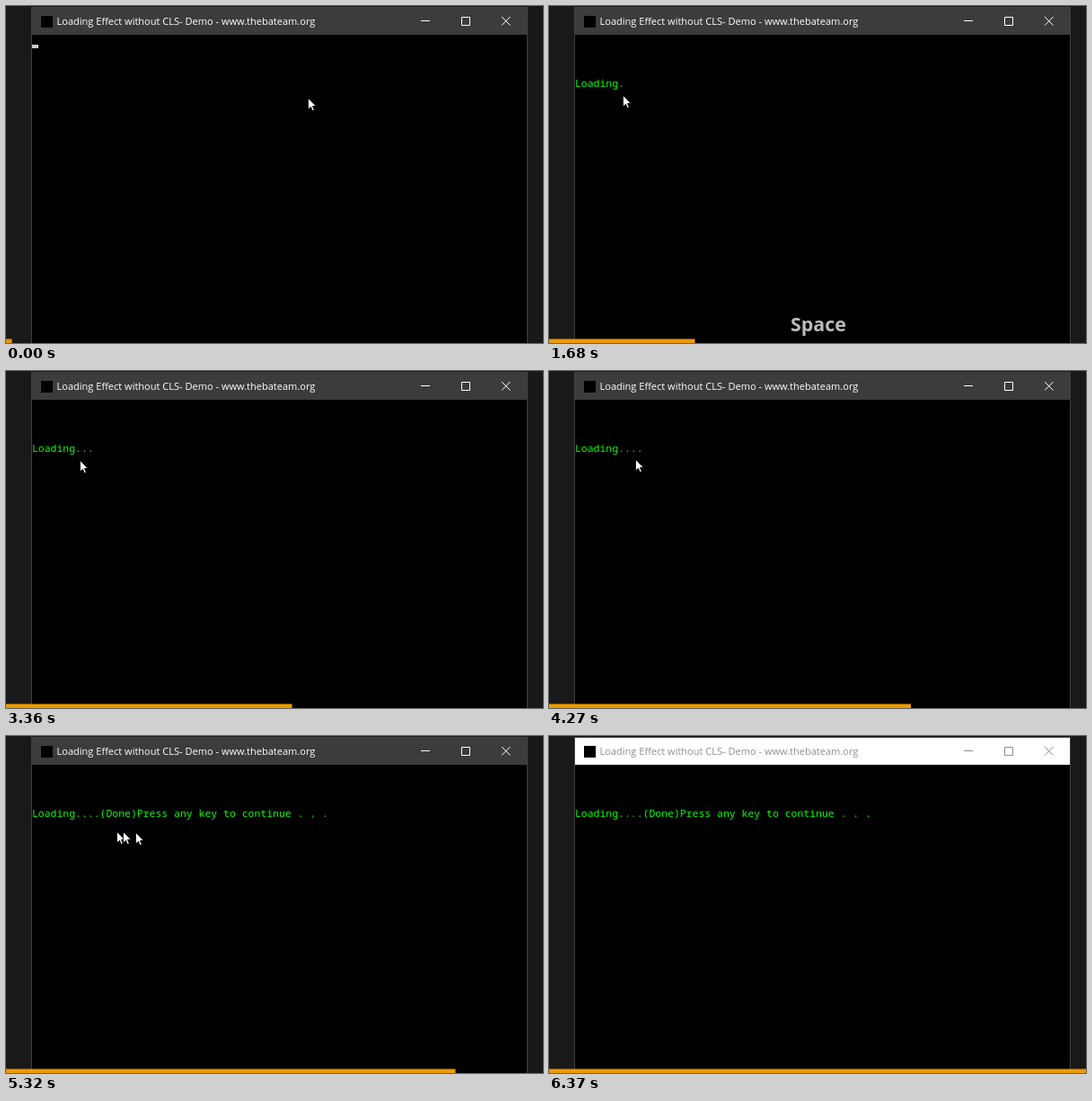
An HTML page with a canvas that plays this animation: 598 by 375 pixels, repeating every 6440 ms.

```html
<!DOCTYPE html>
<html lang="en">
<head>
<meta charset="utf-8">
<title>Loading effect</title>
<style>
  html, body { margin: 0; width: 100%; height: 100%; overflow: hidden; background: #191919; }
  canvas { display: block; }
</style>
</head>
<body>
<canvas id="stage" width="598" height="375"></canvas>
<script>
const ctx = document.getElementById('stage').getContext('2d');
const WIDTH = 598, HEIGHT = 375;
const STEP = 70, STEPS = 92;
const TRAIL_LENGTH = 7, TRAIL_GAP = 35;

const TITLE = 'Loading Effect without CLS- Demo - www.thebateam.org';
const LOADING_AT = 350, FIRST_DOT_AT = 1377, DOT_GAP = 863, DOTS = 4;
const DONE_AT = FIRST_DOT_AT + DOTS * DOT_GAP;
const INACTIVE_AT = 6370;

const POINTER_HOME = { x: 336, y: 102 };
const POINTER_MOVES = [
  { start: 1050, end: 1400, x: 82, y: 99 },
  { start: 3550, end: 3900, x: 96, y: 98 },
  { start: 4700, end: 5100, x: 123, y: 106 },
  { start: 5240, end: 5700, x: 379, y: 119 },
  { start: 5700, end: 6200, x: 573, y: 455 }
];

const clamp = value => Math.max(0, Math.min(1, value));
const ease = k => k * k * (3 - 2 * k);

function pointerAt(time) {
  let { x, y } = POINTER_HOME;
  for (const move of POINTER_MOVES) {
    const k = ease(clamp((time - move.start) / (move.end - move.start)));
    x += (move.x - x) * k;
    y += (move.y - y) * k;
  }
  return { x: Math.round(x), y: Math.round(y) };
}

function rect(color, x, y, w, h) {
  ctx.fillStyle = color;
  ctx.fillRect(x, y, w, h);
}

function text(string, x, y, font, color) {
  ctx.font = font;
  ctx.fillStyle = color;
  ctx.fillText(string, x, y);
}

const ARROW = new Path2D('M.5 .5V13L3.4 10.3L5.3 14.6L7.3 13.7L5.4 9.5H9.2Z');

function drawPointer({ x, y }) {
  ctx.save();
  ctx.translate(x, y);
  ctx.fillStyle = '#fff';
  ctx.strokeStyle = '#000';
  ctx.lineWidth = 0.8;
  ctx.fill(ARROW);
  ctx.stroke(ARROW);
  ctx.restore();
}

function drawTrail(time) {
  let last = {};
  for (let i = TRAIL_LENGTH - 1; i >= 0; i--) {
    const point = pointerAt(time - i * TRAIL_GAP);
    if (point.x !== last.x || point.y !== last.y) drawPointer(point);
    last = point;
  }
}

function drawWindow(active) {
  const ink = active ? '#fff' : '#909090';
  rect('#191919', 0, 0, WIDTH, HEIGHT);
  rect('#404040', 28, 1, 553, HEIGHT);
  rect('#000', 29, 32, 551, HEIGHT);
  rect(active ? '#3c3c3c' : '#fff', 29, 2, 551, 30);
  rect('#000', 39, 11, 13, 13);
  text(TITLE, 56.5, 21, '11.04px "Open Sans", sans-serif', ink);

  ctx.strokeStyle = ink;
  ctx.lineWidth = 1;
  ctx.beginPath();
  ctx.moveTo(462, 16.5);
  ctx.lineTo(472, 16.5);
  ctx.rect(507.5, 12.5, 9, 9);
  ctx.moveTo(552, 12);
  ctx.lineTo(561.5, 21.5);
  ctx.moveTo(561.5, 12);
  ctx.lineTo(552, 21.5);
  ctx.stroke();
}

function drawConsole(time) {
  if (time < LOADING_AT) {
    rect('#ccc', 29, 43, 7, 4);
    return;
  }
  const dots = Math.floor((time - FIRST_DOT_AT) / DOT_GAP) + 1;
  let line = 'Loading' + '.'.repeat(Math.max(0, Math.min(DOTS, dots)));
  if (time >= DONE_AT) line += '(Done)Press any key to continue . . . ';
  text(line, 29, 90, '11.46px "Noto Sans Mono", monospace', '#0f0');
  if (time >= 5700 && time < 6250) rect('#ccc', 366, 89, 7, 4);
}

function drawKeyLabel(time) {
  if (time < LOADING_AT) return;
  ctx.globalAlpha = clamp((1900 - time) / 300);
  text('Space', 269, 361.5, 'bold 21.4px "Open Sans", sans-serif', '#fff');
  ctx.globalAlpha = 1;
}

function draw(now) {
  const step = Math.floor(now / STEP) % STEPS;
  const time = step * STEP;
  drawWindow(time < INACTIVE_AT);
  drawConsole(time);
  drawKeyLabel(time);
  drawTrail(time);
  rect('#ee9a00', 0, 370.5, WIDTH * (step + 1) / STEPS, 4.5);
}

const start = performance.now();
function loop() {
  draw(performance.now() - start);
  requestAnimationFrame(loop);
}
loop();
</script>
</body>
</html>
```
